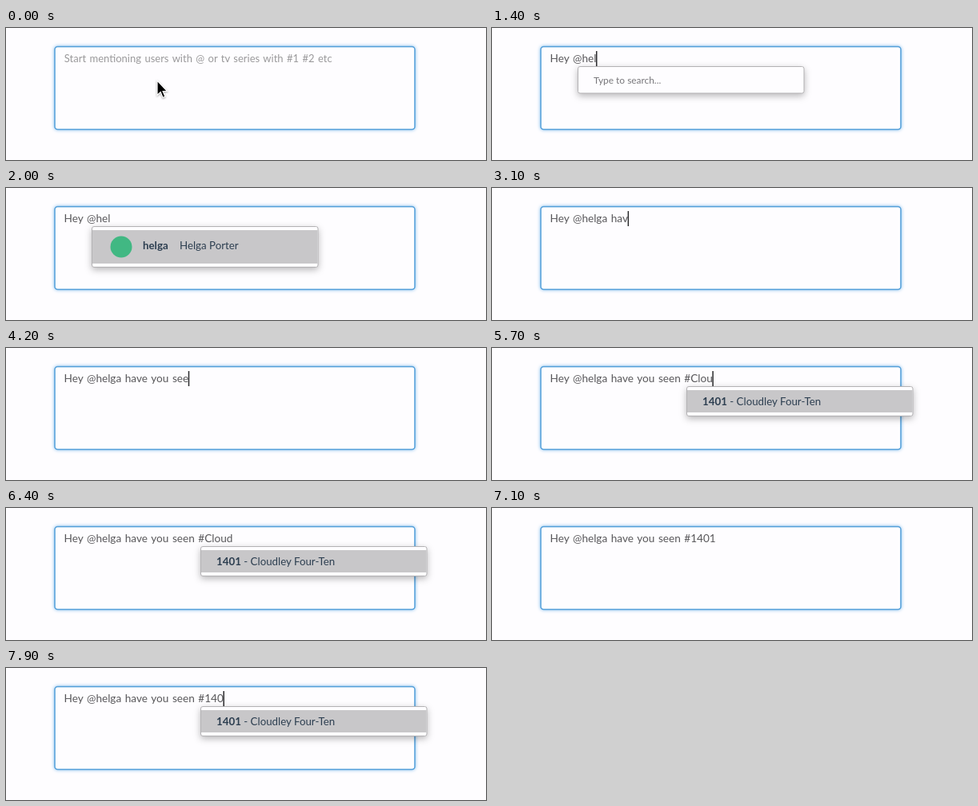
These frames come from a looping animation (600x166 px, 8000 ms). An HTML page:

```html
<!DOCTYPE html>
<html lang="en">
<head>
<meta charset="utf-8">
<title>Mention input</title>
<style>
  html, body { margin: 0; width: 100%; height: 100%; overflow: hidden; background: #fefdff; }
  svg { display: block; width: 600px; height: 166px; }
  text { font: 13.3px Lato, "Open Sans", sans-serif; fill: #2c3e50; white-space: pre; }
  .bold { font-weight: 700; }
  #hint { font-size: 13px; word-spacing: 1.1px; fill: #9a999b; }
  #typed { font-size: 13.6px; word-spacing: 1.1px; fill: #58575a; }
  #search { font-size: 11.9px; fill: #77767a; }
  #field { fill: #fefdff; stroke: #539fd9; stroke-width: 1.5; filter: drop-shadow(0 0 2px #7fbcec); }
  .panel { fill: #fefdff; stroke: #b3b2b4; filter: drop-shadow(0 3px 4px rgba(0, 0, 0, .28)); }
  .row { fill: #c8c7c9; }
  #arrow { stroke: #fff; stroke-width: 1.2; filter: drop-shadow(0 1px 1px rgba(0, 0, 0, .35)); }
</style>
</head>
<body>
<svg viewBox="0 0 600 166">
  <rect id="field" x="61" y="23.5" width="450" height="104" rx="3.5"/>
  <text id="hint" x="72.8" y="43">Start mentioning users with @ or tv series with #1 #2 etc</text>
  <text id="typed" x="72.6" y="43"></text>
  <rect id="caret" y="29" width="1.5" height="19" fill="#2b2b2d"/>

  <g id="empty">
    <rect class="panel" x="107.5" y="48.5" width="282.5" height="33.5" rx="2.5"/>
    <text id="search" x="127" y="70">Type to search...</text>
  </g>

  <g id="user">
    <rect class="panel" x="107.5" y="48.5" width="282.5" height="51" rx="2.5"/>
    <rect class="row" x="108" y="53" width="281.5" height="42"/>
    <circle cx="144" cy="74" r="13.5" fill="#41b883"/>
    <text class="bold" x="171" y="77">helga</text>
    <text x="217" y="77">Helga Porter</text>
  </g>

  <g id="series">
    <rect class="panel" x="243.5" y="48.5" width="282.5" height="37" rx="2.5"/>
    <rect class="row" x="244" y="53" width="281.5" height="28"/>
    <text x="263" y="72"><tspan id="num" class="bold"></tspan><tspan id="label"></tspan></text>
  </g>

  <path id="arrow" d="M189 66V84.5L193.2 80.6L196 87.5L199 86.2L196.1 79.5H201.5Z"/>
</svg>
<script>
const $ = id => document.getElementById(id);
const LOOP = 8000, BLINK = 500;
const ask = "Hey @helga have you seen ";

// [time, text in the field]
const edits = [[0, ""], [200, "H"], [400, "Hey"], [500, "Hey "]];
const type = (base, steps) => steps.forEach(([t, s]) => edits.push([t, base + s]));
type("Hey ", [[1000, "@"], [1100, "@h"], [1300, "@he"], [1400, "@hel"], [2100, "@helga "]]);
type("Hey @helga ", [
  [2900, "h"], [3000, "ha"], [3100, "hav"], [3300, "have "], [3500, "have yo"],
  [3700, "have you "], [3900, "have you s"], [4100, "have you se"],
  [4200, "have you see"], [4300, "have you seen"], [4400, "have you seen "]
]);
type(ask, [
  [4900, "#"], [5200, "#C"], [5300, "#Cl"], [5500, "#Clo"], [5700, "#Clou"], [5900, "#Cloud"],
  [6600, "#1401 "], [7800, "#1401"], [7900, "#140"]
]);

const show = (id, on) => $(id).style.display = on ? "" : "none";

function draw(t) {
  const within = (a, b) => t >= a && t < b;
  const [since, text] = edits.filter(e => e[0] <= t).pop();
  const typed = $("typed");
  if (typed.textContent !== text) typed.textContent = text;

  show("hint", !text);
  show("arrow", !text);
  show("caret", text && Math.floor((t - since) / BLINK) % 2 === 0);
  if (text) $("caret").setAttribute("x", 72.2 + typed.getComputedTextLength());

  show("empty", within(1000, 1500));
  show("user", within(1500, 2100));
  show("series", within(4900, 6600) || t >= 7800);
  const first = t < 5300;
  $("num").textContent = first ? "102" : "1401";
  $("label").textContent = first ? " - Calvy: Season 1" : " - Cloudley Four-Ten";
}

const start = performance.now();
function frame() {
  draw((performance.now() - start) % LOOP);
  requestAnimationFrame(frame);
}
frame();
</script>
</body>
</html>
```
